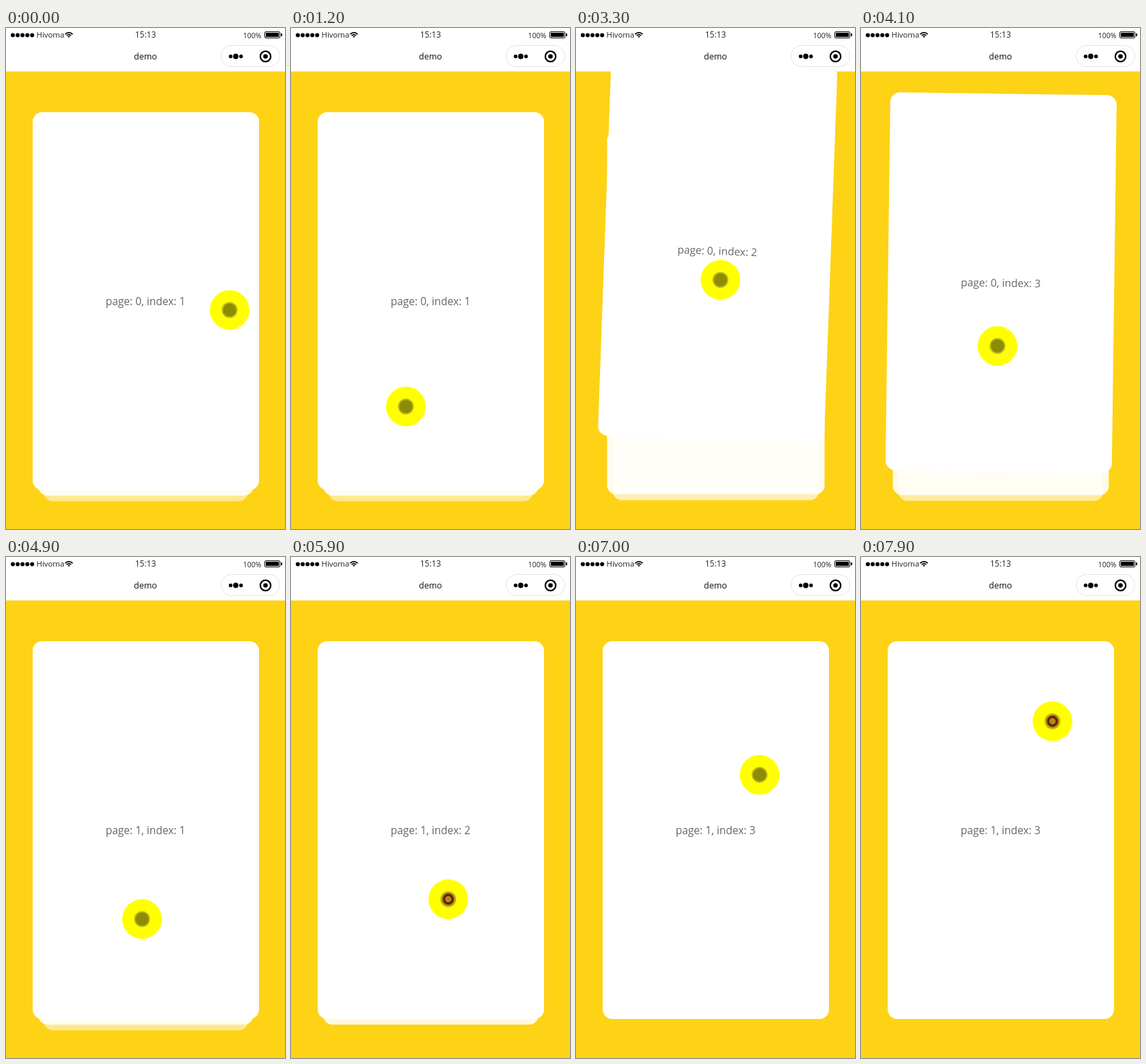
An HTML page that plays this animation: 408x732 px, repeating every 8000 ms.

```html
<!DOCTYPE html>
<html lang="en">
<head>
<meta charset="utf-8">
<title>Card stack</title>
<style>
  html, body { margin: 0; width: 100%; height: 100%; overflow: hidden; background: #fed215; }
  svg { display: block; width: 100vw; height: 100vh; }
  text { font-family: "Open Sans", "Noto Sans", sans-serif; text-anchor: middle; }
  #halo { mix-blend-mode: multiply; }
</style>
</head>
<body>
<svg viewBox="0 0 408 732">
  <rect width="408" height="732" fill="#fed215"/>
  <g id="stack"></g>

  <g id="header">
    <rect width="408" height="63.5" fill="#fff"/>
    <g id="signal"></g>
    <text x="44.5" y="14" font-size="11.4" fill="#222" style="text-anchor:start">Hivoma</text>
    <g fill="none" stroke="#000" stroke-width="1.7">
      <path d="M86.5 9 Q92 4.2 97.5 9"/>
      <path d="M88.7 11.2 Q92 8.2 95.3 11.2"/>
    </g>
    <path d="M90.3 12.3 Q92 10.8 93.7 12.3 L92 14.3Z"/>
    <text x="204" y="14" font-size="12" fill="#222">15:13</text>
    <text x="360" y="14.5" font-size="10.5" fill="#222">100%</text>
    <rect x="378.5" y="5.5" width="22" height="9" rx="1.5" fill="none" stroke="#000"/>
    <rect x="380" y="7" width="19" height="6"/>
    <rect x="402" y="8" width="1.8" height="4"/>
    <text x="204" y="46" font-size="12.5" fill="#111">demo</text>
    <rect x="314.5" y="25.5" width="86" height="31" rx="15.5" fill="#fff" stroke="#e4e4e4"/>
    <circle cx="328.5" cy="41.5" r="2.7"/>
    <circle cx="336" cy="41.5" r="3.9"/>
    <circle cx="343.7" cy="41.5" r="2.7"/>
    <circle cx="379.5" cy="41.5" r="7.6" fill="none" stroke="#000" stroke-width="2.2"/>
    <circle cx="379.5" cy="41.5" r="3.3"/>
  </g>

  <circle id="halo" r="29" fill="#ff0"/>
  <g id="dot">
    <circle r="11.5" fill="#b9b41c"/>
    <circle r="9.5" fill="#8e8b05"/>
    <circle id="ring" r="6.3" fill="#a3920f" stroke="#7d130c" stroke-width="3.2"/>
  </g>
</svg>
<script>
const NS = 'http://www.w3.org/2000/svg';
const $ = id => document.getElementById(id);
const LOOP = 8000, STEP = 100, DRAG = 500;
const CX = 204.5, CY = 399, W = 331, H = 552;
const PULL = { x: 31, y: -131 };

const stop = (t, x, y, press, swipe) => ({ t, x, y, press, swipe });
const grab = (t, x, y) => stop(t, x, y, true, true);
const STOPS = [
  stop(400, 327, 412), stop(1300, 168, 553),
  grab(2200, 207, 347), grab(3100, 193, 445), grab(4000, 190, 505), grab(5000, 199, 529), grab(5900, 230, 500),
  stop(7900, 280, 240, true)
];
const SWIPES = STOPS.filter(s => s.swipe);

const clamp = v => Math.min(1, Math.max(0, v));
const mix = (a, b, k) => a + (b - a) * k;
const smooth = k => k * k * (3 - 2 * k);

// Card follows the finger, then is thrown off the top.
function travelAt(ms) {
  const u = Math.max(0, ms / 100);
  return 27 * u ** 1.45 + 31 * Math.max(0, u - 4) ** 2.5;
}

function pointerAt(time) {
  const i = Math.max(0, STOPS.findLastIndex(s => s.t <= time));
  const from = STOPS[i], to = STOPS[i + 1] || from;
  const hold = from.swipe ? DRAG : 0;
  const pull = from.swipe ? Math.sin(clamp((time - from.t) / DRAG) * Math.PI / 2) : 0;
  const k = smooth(clamp((time - from.t - hold) / Math.max(1, to.t - STEP - from.t - hold)));
  return {
    x: mix(from.x + PULL.x * pull, to.x, k),
    y: mix(from.y + PULL.y * pull, to.y, k)
  };
}

function add(parent, tag, attrs) {
  const el = document.createElementNS(NS, tag);
  for (const k in attrs) el.setAttribute(k, attrs[k]);
  return parent.appendChild(el);
}

for (let i = 0; i < 5; i++) add($('signal'), 'circle', { cx: 10 + i * 7.05, cy: 10.5, r: 3 });

const cards = Array.from({ length: 6 }, (_, i) => {
  const g = add($('stack'), 'g', {});
  $('stack').prepend(g);
  add(g, 'rect', { x: -W / 2, y: -H / 2, width: W, height: H, rx: 14, fill: '#fff' });
  const label = add(g, 'text', { x: -0.5, y: 6, 'font-size': 15.5, fill: '#666' });
  label.textContent = `page: ${Math.floor(i / 3)}, index: ${i % 3 + 1}`;
  return g;
});

function draw(time) {
  const travel = SWIPES.map(s => travelAt(time - s.t));
  const passed = travel.reduce((sum, d) => sum + clamp(d / W), 0);

  cards.forEach((card, i) => {
    const depth = Math.max(0, i - passed), level = Math.min(2, depth);
    const d = travel[i] || 0;
    card.setAttribute('transform',
      `translate(${CX} ${CY}) rotate(${d * 0.028}) translate(0 ${22 * level - d}) scale(${1 - 0.05 * level})`);
    card.setAttribute('opacity', clamp(1 - 0.13 * depth ** 1.85));
    card.setAttribute('visibility', d > 750 || depth >= 3 ? 'hidden' : 'visible');
  });

  const p = pointerAt(time), at = `translate(${p.x} ${p.y})`;
  $('halo').setAttribute('transform', at);
  $('dot').setAttribute('transform', at);
  const pressed = STOPS.some(s => s.press && s.t === time);
  $('ring').setAttribute('visibility', pressed ? 'visible' : 'hidden');
}

const start = performance.now();
function tick() {
  const t = (performance.now() - start) % LOOP;
  draw(Math.floor(t / STEP) * STEP);
  requestAnimationFrame(tick);
}
tick();
</script>
</body>
</html>
```
